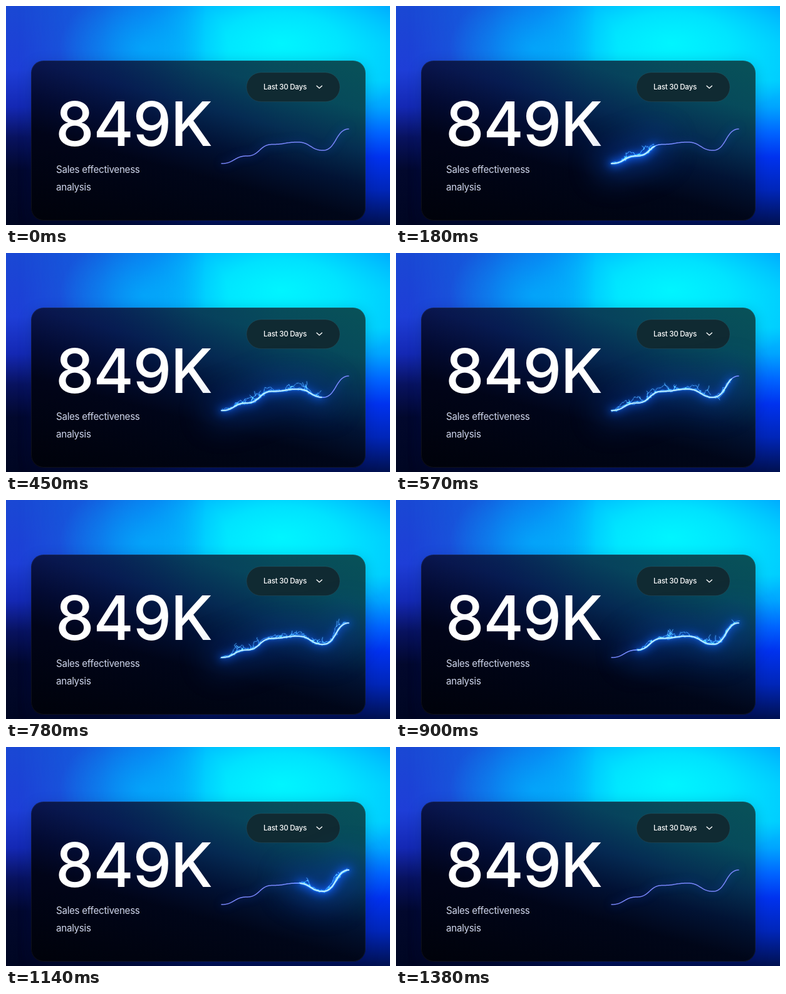
These frames come from a looping animation (613x349 px, 1800 ms). An HTML page with a canvas:

```html
<!DOCTYPE html>
<html lang="en">
<head>
<meta charset="utf-8">
<title>Sales effectiveness</title>
<style>
  html, body { margin: 0; width: 100%; height: 100%; overflow: hidden; }
  body {
    position: relative;
    background: linear-gradient(rgb(26,72,212), rgb(30,62,215) 29%, rgb(20,40,180) 46%,
      rgb(8,18,95) 60%, rgb(2,8,45) 75%, rgb(0,6,34));
  }
  .sky, .card, svg, canvas { position: absolute; left: 0; top: 0; width: 613px; height: 349px; }
  .sky {
    background:
      radial-gradient(ellipse 230px 125px at 440px 60px, rgb(0,245,255), rgba(0,240,255,.8) 40%, rgba(0,215,255,0)),
      linear-gradient(rgb(0,160,255), rgb(0,190,255) 17%, rgb(0,200,255) 34%, rgb(0,165,255) 46%,
        rgb(0,100,255) 58%, rgb(0,50,238) 69%, rgb(0,38,185) 84%, rgb(0,16,80));
    -webkit-mask-image: linear-gradient(90deg, transparent 3%, rgba(0,0,0,.25) 25%, #000 52%);
    mask-image: linear-gradient(90deg, transparent 3%, rgba(0,0,0,.25) 25%, #000 52%);
  }
  .haze { background: radial-gradient(ellipse 135px 100px at 220px 68px, rgba(0,175,255,.7), rgba(0,165,255,.45) 45%, rgba(0,150,255,0)); -webkit-mask-image: none; mask-image: none; }
  .card {
    left: 40px; top: 87px; width: 534px; height: 255px; border-radius: 20px;
    background:
      linear-gradient(195deg, rgba(4,70,95,0), rgba(2,50,100,.22) 20%, rgba(2,14,75,.52) 36%,
        rgba(0,7,45,.84) 50%, rgba(0,3,22,.96) 64%, rgb(0,2,10)),
      linear-gradient(90deg, rgb(18,28,78), rgb(11,42,88) 25%, rgb(8,68,90) 50%, rgb(8,80,90) 75%, rgb(8,82,88));
    box-shadow: inset 0 0 0 1px rgba(255,255,255,.06), 0 6px 22px rgba(0,10,60,.22);
  }
  text { font-family: Inter, sans-serif; fill: #fff; }
  .value { font-size: 98px; font-weight: 500; letter-spacing: -1.3px; }
  .label { font-size: 15.2px; letter-spacing: -.3px; fill: rgb(208,215,236); }
  .range { font-size: 11.7px; font-weight: 500; letter-spacing: -.3px; }
</style>
</head>
<body>
<div class="sky"></div>
<div class="sky haze"></div>
<div class="card"></div>
<svg viewBox="0 0 613 349">
  <rect x="384" y="106" width="149" height="46.5" rx="23.25" fill="rgb(16,42,50)" stroke="rgba(255,255,255,.06)"/>
  <text class="range" x="411" y="133">Last 30 Days</text>
  <path d="M496 127.3l4.2 3.7 4.2-3.7" fill="none" stroke="#fff" stroke-width="1.4" stroke-linecap="round" stroke-linejoin="round"/>
  <text class="value" x="79" y="223">849K</text>
  <text class="label" x="80" y="266">Sales effectiveness</text>
  <text class="label" x="80" y="294">analysis</text>
</svg>
<canvas width="613" height="349"></canvas>
<script>
const LOOP = 1800, STEP = 30, LEFT = 344, WIDTH = 203;
const heights = [251, 239, 220.5, 217, 230, 196];
const ctx = document.querySelector('canvas').getContext('2d');
const clamp = (v, lo = 0, hi = 1) => Math.min(hi, Math.max(lo, v));

// Cubic segments with level tangents through the data points
const curve = [];
for (let i = 0; i <= 200; i++) {
  const k = Math.min(4, Math.floor(i / 40)), u = i / 40 - k;
  const px = 1.5 * u * (1 - u) + u ** 3, py = u * u * (3 - 2 * u);
  curve.push([
    LEFT + WIDTH / 5 * (k + px),
    heights[k] + (heights[k + 1] - heights[k]) * py
  ]);
}

function random(seed) {
  let s = seed * 7919 + 17;
  return () => {
    s = (s + 0x6D2B79F5) | 0;
    let n = Math.imul(s ^ (s >>> 15), 1 | s);
    n = (n + Math.imul(n ^ (n >>> 7), 61 | n)) ^ n;
    return ((n ^ (n >>> 14)) >>> 0) / 4294967296;
  };
}

function stroke(points, color, width, blur = 0, glow = color) {
  ctx.beginPath();
  points.forEach(p => ctx.lineTo(...p));
  ctx.strokeStyle = color;
  ctx.lineWidth = width;
  ctx.shadowBlur = blur;
  ctx.shadowColor = glow;
  ctx.stroke();
}

function halo(points, color, width, radius) {
  ctx.filter = `blur(${radius}px)`;
  stroke(points, color, width);
  ctx.filter = 'none';
}

const spark = (points, width = .8) => stroke(points, 'rgba(110,205,255,.7)', width, 3, 'rgba(42,144,255,.7)');

// Frayed strand that wanders around the lit part
function strand(points, rand, spread) {
  spark(points.filter((_, i) => i % 3 === 0)
    .map(([x, y]) => [x + (rand() - .5) * spread, y + (rand() - .6) * spread]), .6);
}

// Filament running beside the line, with short twigs
function filament(from, length, height, side, end, rand) {
  const run = [];
  for (let i = from; i < Math.min(from + length, end); i += 2) {
    const [x, y] = curve[i];
    const lift = Math.sin(Math.PI * (i - from) / length) * height + (rand() - .4) * 4;
    const tip = [x + (rand() - .5) * 3, y - side * lift];
    run.push(tip);
    if (rand() < .14) {
      const h = side * (3 + rand() * 6);
      spark([tip, [tip[0] + rand() * 4 - 2, tip[1] - h / 2], [tip[0] + rand() * 6 - 3, tip[1] - h]]);
    }
  }
  ctx.setLineDash([4, 1.5]);
  spark(run);
  ctx.setLineDash([]);
}

function lightning(t) {
  const a = clamp((t - 780) / 585), b = 1 - (1 - clamp(t / 630)) ** 1.235;
  const inside = ([x]) => x >= LEFT + a * WIDTH && x <= LEFT + b * WIDTH;
  const lit = curve.filter(inside);
  if (lit.length < 2) return;
  const start = curve.findIndex(inside), end = start + lit.length;
  const flicker = random(t / STEP + 1), place = random(Math.floor(t / 120) + 40);
  const power = clamp(.55 / (b - a), .6, 1);  // a shorter arc burns brighter

  ctx.globalCompositeOperation = 'lighter';
  halo(lit, `rgba(8,65,165,${.5 * power})`, 50, 22);
  halo(lit, `rgba(15,95,240,${.5 * power})`, 13, 7);
  stroke(lit, `rgba(40,130,255,${.5 * power})`, 2.4, 5, '#2a86ff');
  strand(lit, flicker, 4);
  strand(lit, flicker, 6);
  for (let i = 0; i < 9; i++) {
    const from = Math.floor((i + place()) * 21), length = 12 + place() * 14;
    const height = 3 + place() * 7, side = from > 150 && place() < .6 ? -.6 : 1;
    if (from >= start && from < end) filament(from, length, height, side, end, flicker);
  }
  ctx.globalCompositeOperation = 'source-over';
  stroke(lit, 'rgb(196,236,255)', 1.2 + .6 * power, 2, '#5ab4ff');
}

function draw(now) {
  const t = Math.floor(now % LOOP / STEP) * STEP;
  ctx.clearRect(0, 0, 613, 349);
  ctx.lineCap = ctx.lineJoin = 'round';
  stroke(curve, 'rgb(122,134,250)', 1.5, 14, 'rgba(40,90,255,.75)');
  if (t > 0 && t < 1380) lightning(t);
  requestAnimationFrame(() => draw(performance.now()));
}
draw(0);
</script>
</body>
</html>
```
